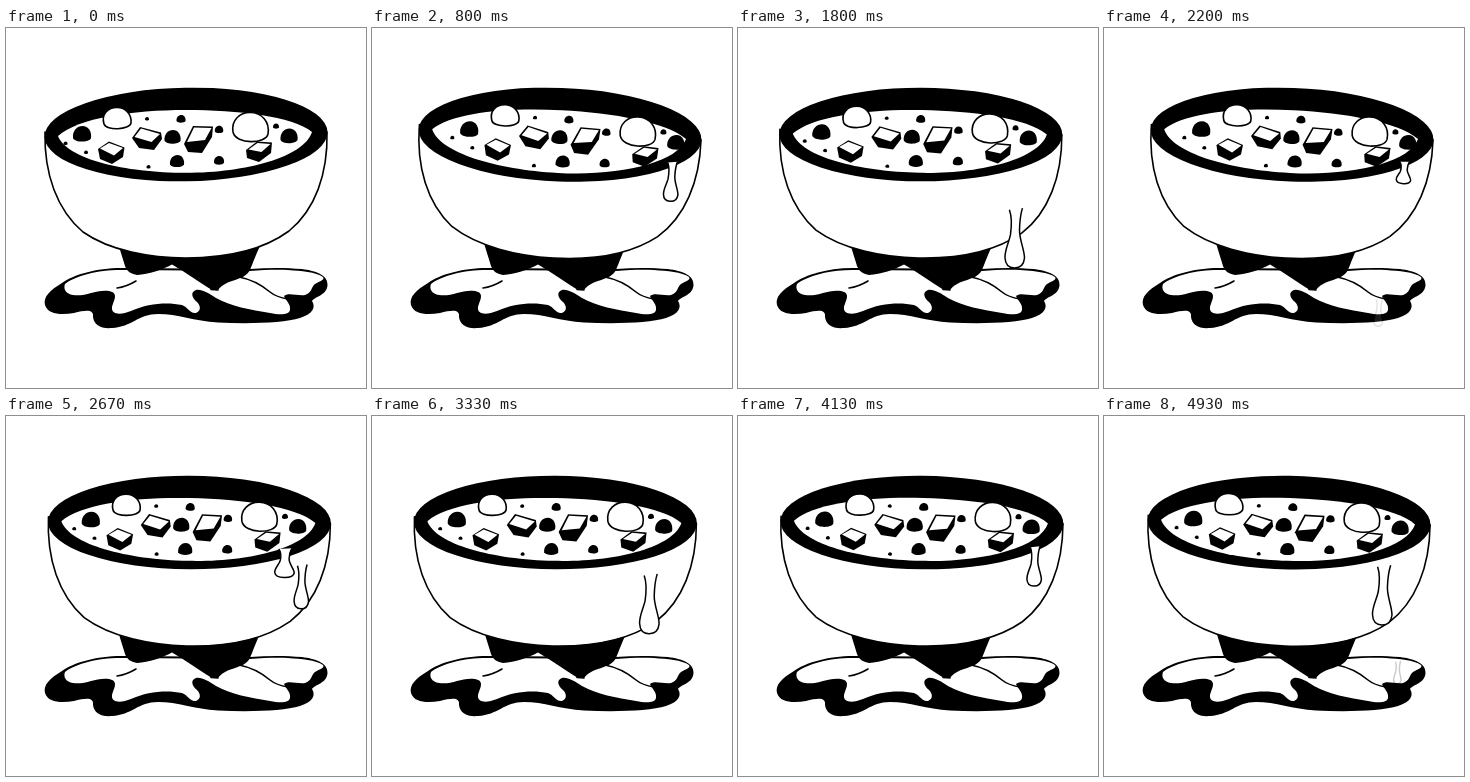
Animation, 360 px wide and 360 px high, one loop 5 s. Source, as an HTML page:

```html
<!DOCTYPE html>
<html lang="en">
<head>
<meta charset="utf-8">
<title>Soup bowl</title>
<style>
  html, body { margin: 0; width: 100%; height: 100%; overflow: hidden; background: #fff; }
  svg { display: block; width: 100vw; height: 100vh; }
  .line { fill: none; stroke: #000; stroke-width: 1.6; stroke-linecap: round; stroke-linejoin: round; }
  .white { fill: #fff; }
  .drip { fill: #fff; stroke: #000; stroke-width: 1.5; vector-effect: non-scaling-stroke; }
</style>
</head>
<body>
<svg viewBox="0 0 360 360">
  <defs>
    <path id="drop" class="drip" d="M-6-58C-3-50-3.5-41-4.5-33C-6-25-10-18-9.5-10C-9-3-5 0 0 0C6 0 9.5-4 10-10C10-18 4.5-28 4.5-38C4.5-46 5-53 7-60"/>
    <path id="dome" d="M-1 .35C-1.1-.5-.5-1 .05-1C.7-1 1.1-.4 1 .35C.8.8-.7.9-1 .35Z"/>
  </defs>

  <!-- cloth -->
  <path d="M120 240C94 239 68 246 56 255C44 262 37 269 39 277C42 287 56 287 68 285C80 282 88 281 87 289C88 297 95 301 106 300C126 299 132 286 152 286C172 286 188 293 212 294.5C244 296 278 295 294 290C307 286 310 279 306 273C310 268 321 267 321.5 257C322 247 310 243 296 241C280 239.500 262 239.500 244 241Z"/>
  <path class="white" d="M120 242C95 241 70 247 59 256C57 261 60 266 67 267C80 269 90 261 103 263C113 265 108 272 106 279C105 287 115 287 125 283C142 275 162 274 176 277C182 279 184 286 190 285C195 283 195 278 191 274C186 270 184 264 190 262C196 261 202 265 210 270C224 278 245 282 264 285C274 287 283 287 284 282C285 276 280 273 278 268C282 264 291 268 299 267C306 265 305 259 309 256C314 253 319 252 317 249C310 244 295 243 282 242C270 241.500 257 242 244 243Z"/>
  <path class="line" d="M111 260C119 259 125 256 130 253M233 249C249 252 258 259 264 264C270 269 276 270 282 271"/>

  <!-- foot -->
  <path d="M111 212C114 222 117 231 119 238C121 244 126 246 131 247C143 246 156 242 166 236.500C179 244 193 254 205 261.500L212 262C216 257 220 255 226 253C235 250 241 248 244 242C247 235 249 228 256 214Z"/>
  <path class="line" d="M205 261.500L212 262"/>

  <g id="bowl">
    <path class="line" style="fill:#fff" d="M39 104C38 146 51 182 77 204C104 223 145 230 180 230C219 230 257 222 283 203C309 182 322 146 321 104"/>
    <ellipse cx="180" cy="106.500" rx="141.500" ry="46.800" transform="rotate(-1 180 106)"/>
    <path class="white" d="M52 108C72 90 126 82 180 82C232 82 286 88 306 104C298 129 240 144.800 180 144.800C118 144.800 61 131 52 108Z"/>
    <g id="bits"></g>
    <use id="dripA" href="#drop"/>
    <use id="dripB" href="#drop"/>
  </g>
</svg>
<script>
const LOOP = 5000, STEP = 1000 / 15, SWAY = 1500, DRIP = LOOP / 3;
const GROW = 110, LIFE = 1280, FADE = 190, DROP_HEIGHT = 60;
const $ = id => document.getElementById(id);

// x, y, radius
const dots = [
  [76, 107, 9], [166.5, 110, 8], [171, 134, 7], [283, 109, 8.5],
  [175, 91.5, 4.5], [213, 133, 5], [213, 102, 4.2], [270, 98.5, 3],
  [59.5, 115.5, 2], [80, 124.5, 2], [141, 91, 2], [142.5, 139, 2]
];
const bubbles = [
  "M98 96C95 86 102 79.5 111 79.5C120 79.5 126 87 125 95C124 102 100 103 98 96Z",
  "M227 104C225 92 234 84.500 244 84.500C256 84.500 264 94 262 106C260 116 230 117 227 104Z"
];
// silhouette, then the white top
const cubes = [
  ["M92 121L103 113.5L118.5 119.500L117 129L106 136L94 131Z", "M94 120.500L103 115L117 120L108 127.500Z"],
  ["M126 110L134 99L155 104.500L156 111L148 122L133 120Z", "M128.500 109L135 100.500L154 106L145.500 114Z"],
  ["M178 116L187 98L207 98.500L206 109L196 125L182 124Z", "M181 114L188 99.500L205.500 100L199 112Z"],
  ["M240 122L251 113.500L266 114.500L265 125L253 134L241 130Z", "M242.500 121.500L251.500 115L264.500 116L255.500 124Z"]
];

$("bits").innerHTML =
  dots.map(([x, y, r]) => `<use href="#dome" transform="translate(${x} ${y}) scale(${r})"/>`).join("") +
  bubbles.map(d => `<path class="line" style="fill:#fff" d="${d}"/>`).join("") +
  cubes.map(([body, face]) => `<path d="${body}"/><path class="white" d="${face}"/>`).join("");

const drips = [
  { el: $("dripA"), x: 293.5, y: 146, lip: 127, floor: 264, start: 357, size: 0.74 },
  { el: $("dripB"), x: 276, y: 159, lip: 130, floor: 293, start: 940, size: 1 }
];

// A drip stretches from the lip to its full length, then slides and fades.
function moveDrip({ el, x, y, lip, floor, start, size }, t) {
  let age = (t - start + DRIP * 2) % DRIP;
  if (age > DRIP - GROW) age -= DRIP;
  const shown = t > 0 && age < LIFE;
  el.style.display = shown ? "" : "none";
  if (!shown) return;
  const fall = age < 0 ? age * 0.15 : 0.000107 * age * age;
  const bottom = Math.min(floor, y + fall);
  const left = Math.min(1, (LIFE - age) / FADE);
  const shrink = 0.4 + 0.6 * left;
  const tall = Math.min(size, (bottom - lip) / DROP_HEIGHT);
  el.setAttribute("transform", `translate(${x} ${bottom}) scale(${size * shrink} ${tall * shrink})`);
  el.setAttribute("opacity", left);
}

function draw(now) {
  const t = Math.floor(((now % LOOP) + 4) / STEP) % 75 * STEP;
  const sway = (1 - Math.cos(2 * Math.PI * t / SWAY)) / 2;
  $("bowl").setAttribute("transform", `rotate(${3.15 * sway} 180 255)`);
  $("bits").setAttribute("transform", `translate(${13.2 * sway} 0)`);
  drips.forEach(d => moveDrip(d, t));
}

const begin = performance.now();
function tick() {
  draw(performance.now() - begin);
  requestAnimationFrame(tick);
}
tick();
</script>
</body>
</html>
```
